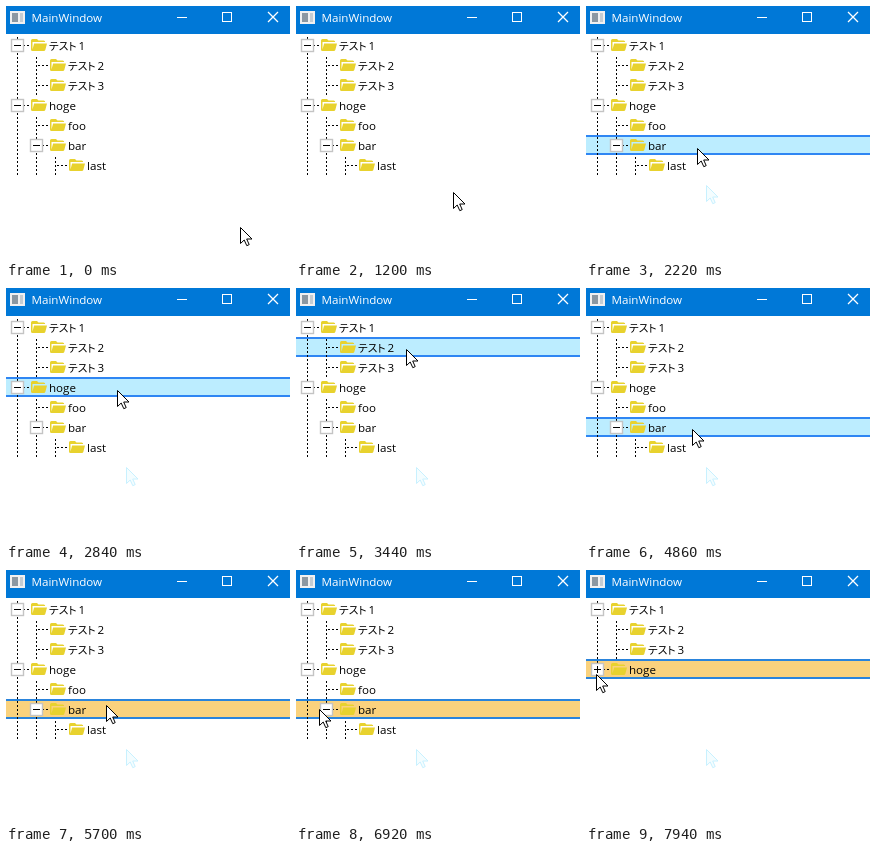
Animation of 284x254 px, one loop 8 s. Source, as an HTML page:

```html
<!DOCTYPE html>
<html lang="ja">
<head>
<meta charset="utf-8">
<title>MainWindow</title>
<style>
  html, body { margin: 0; width: 100%; height: 100%; overflow: hidden; background: #fff; }
  svg { display: block; width: 100%; height: 100%; }
  text { font: 11.6px "Open Sans", "Noto Sans", sans-serif; fill: #000; white-space: pre; }
  .title { fill: #fff; }
  .kana { font: 10.7px "Noto Sans CJK JP", "Noto Sans CJK", sans-serif; font-feature-settings: "palt"; }
  .dots { stroke: #000; stroke-dasharray: 2 2; stroke-dashoffset: 2; fill: none; }
  .crisp { shape-rendering: crispEdges; }
</style>
</head>
<body>
<svg viewBox="0 0 284 254">
  <rect width="284" height="254" fill="#fff"/>
  <g class="crisp">
    <rect width="284" height="28" fill="#0078d7"/>
    <rect x="4" y="5" width="15" height="13" fill="#f0f0f0"/>
    <rect x="6" y="7" width="6" height="9" fill="#8c98a2"/>
    <rect x="14" y="7" width="3" height="9" fill="#c4ccd2"/>
    <path d="M171 11.5h10M216.5 6.5h9v9h-9z" fill="none" stroke="#fff"/>
  </g>
  <path d="M262 6l10 10m0-10l-10 10" stroke="#fff" stroke-width="1.3"/>
  <text class="title" x="25.5" y="16">MainWindow</text>
  <g id="tree"></g>
  <path id="trace" d="M.5.5V16.5L4.2 13 6.8 18.7 9.2 17.6 6.7 12H12z"
    transform="translate(120 179)" fill="#f4fdff" stroke="#c8f1ff"/>
  <path id="cursor" d="M.5.5V16.5L4.2 13 6.8 18.7 9.2 17.6 6.7 12H12z" fill="#fff" stroke="#000"/>
</svg>
<script>
const LOOP = 8000, TICK = 203, TOP = 29, ROW = 20;
const SELECT = 28, COLLAPSE = 39, TRACE = 7; // ticks
const tree = document.getElementById('tree');
const trace = document.getElementById('trace');
const cursor = document.getElementById('cursor');

const rows = [
  { label: 'テスト', digit: 1, depth: 0, branch: true },
  { label: 'テスト', digit: 2, depth: 1 },
  { label: 'テスト', digit: 3, depth: 1 },
  { label: 'hoge', depth: 0, branch: true },
  { label: 'foo', depth: 1 },
  { label: 'bar', depth: 1, branch: true },
  { label: 'last', depth: 2 }
];

// Pointer waypoints; it glides evenly from one to the next.
const path = [
  { at: 1, x: 234, y: 221 },
  { at: 7, x: 119, y: 168 },
  { at: 11, x: 111, y: 142 },
  { at: 17, x: 110, y: 61 },
  { at: 19, x: 112, y: 40 },
  { at: 21, x: 114, y: 89 },
  { at: 24, x: 106, y: 141 },
  { at: 26, x: 100, y: 135 },
  { at: 30, x: 100, y: 135 },
  { at: 32, x: 62, y: 214 },
  { at: 34, x: 23, y: 139 },
  { at: 37, x: 10, y: 104 }
];

function pointerAt(tick) {
  const next = path.findIndex(p => p.at > tick);
  if (next === 0) return path[0];
  if (next < 0) return path[path.length - 1];
  const a = path[next - 1], b = path[next];
  const mix = (tick - a.at) / (b.at - a.at);
  return {
    x: Math.round(a.x + (b.x - a.x) * mix),
    y: Math.round(a.y + (b.y - a.y) * mix)
  };
}

const dots = d => `<path class="dots crisp" d="${d}"/>`;

function highlight(row, fill, edge) {
  const y = TOP + row * ROW;
  return `<g class="crisp"><rect y="${y}" width="284" height="${ROW}" fill="${edge}"/>
    <rect y="${y + 2}" width="284" height="${ROW - 4}" fill="${fill}"/></g>`;
}

function expander(x, y, closed) {
  return `<rect x="${x - 5.5}" y="${y - 5.5}" width="12" height="12" fill="#fff" stroke="#c4c4c4" stroke-width="1.4"/>
    <path class="crisp" d="M${x - 3} ${y + .5}h7${closed ? `M${x + .5} ${y - 3}v7` : ''}" stroke="#000"/>`;
}

function folder(x, y) {
  return `<path transform="translate(${x} ${y})" fill="#e8d22e"
    d="M1.5 0H6L7.5 1.5H12.7Q14.2 1.5 14.2 3H1.5V10.5L3.1 4.5H16L14.3 10.9Q14 12 12.8 12H1.5Q0 12 0 10.5V1.5Q0 0 1.5 0z"/>`;
}

function rowMarkup(row, i, collapsed) {
  const x = 11 + row.depth * 19, y = TOP + 10 + i * ROW;
  const left = x + 32;
  const digit = row.digit ? `<text x="${left + 29.5}" y="${y + 5}">${row.digit}</text>` : '';
  return dots(`M${x} ${y + .5}h13`)
    + (row.branch ? expander(x, y, collapsed && i === 3) : '')
    + folder(x + 14, y - 6)
    + `<text class="${row.digit ? 'kana' : ''}" x="${left}" y="${y + 5}">${row.label}</text>` + digit;
}

function treeMarkup(hover, selected, collapsed) {
  const shown = collapsed ? rows.slice(0, 4) : rows;
  let out = '';
  if (shown[hover] && hover !== selected) out += highlight(hover, '#bcedff', '#2f86f3');
  if (selected >= 0) out += highlight(selected, '#fad27d', '#2a84dc');
  out += dots(`M11.5 ${TOP}V${TOP + shown.length * ROW}M30.5 49V89`);
  if (!collapsed) out += dots('M30.5 109V169M49.5 149V169');
  return out + shown.map((row, i) => rowMarkup(row, i, collapsed)).join('');
}

let lastTick = -1;
function draw() {
  const tick = Math.floor((performance.now() % LOOP + 15) / TICK);
  if (tick !== lastTick) {
    lastTick = tick;
    const { x, y } = pointerAt(tick);
    const collapsed = tick >= COLLAPSE;
    const selected = collapsed ? 3 : tick >= SELECT ? 5 : -1;
    tree.innerHTML = treeMarkup(Math.floor((y - TOP - 1) / ROW), selected, collapsed);
    trace.style.visibility = tick >= TRACE ? 'visible' : 'hidden';
    cursor.setAttribute('transform', `translate(${x} ${y})`);
  }
  requestAnimationFrame(draw);
}
draw();
</script>
</body>
</html>
```
